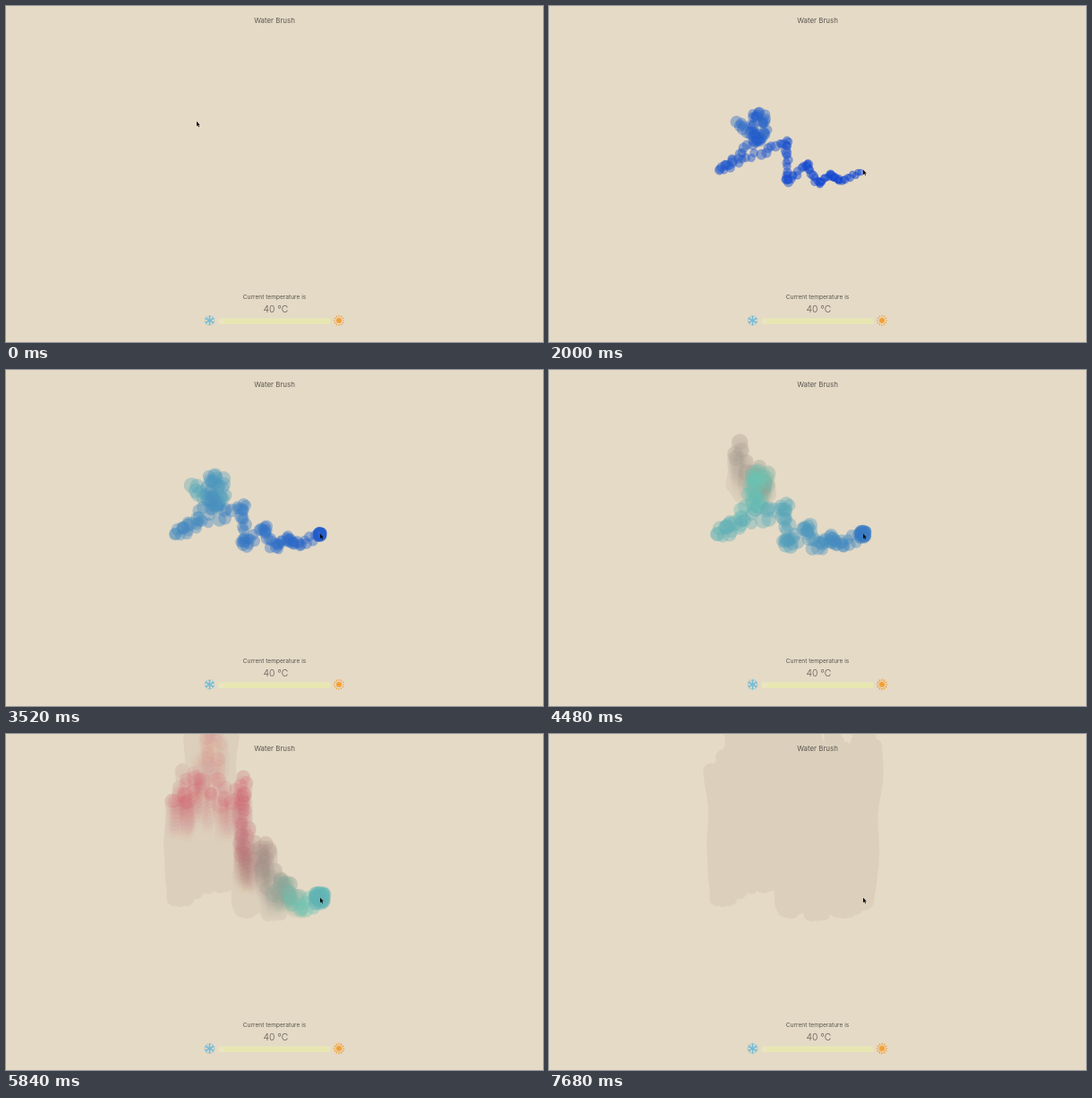
An HTML page with a canvas for the animation above (8 s loop, 600 by 375 pixels).

```html
<!DOCTYPE html>
<html lang="en">
<head>
<meta charset="utf-8">
<title>Water Brush</title>
<style>
  html, body { margin: 0; width: 100%; height: 100%; overflow: hidden; background: #e5dac6; }
  canvas { display: block; width: 600px; height: 375px; }
</style>
</head>
<body>
<canvas id="stage" width="600" height="375"></canvas>
<script>
const ctx = document.getElementById('stage').getContext('2d');
const LOOP = 8000, STEP = 80, TAU = Math.PI * 2;
const PAPER = '#e5dac6', RESIDUE = '#dcd0bc';
const BRUSH_START = 130, BRUSH_END = 2260, BRUSH_LAG = 70, DROP_EVERY = 12.5;
const LIFT_OFF = 3.9; // age in seconds at which water turns to vapour

const lerp = (a, b, k) => a + (b - a) * k;
const clamp = v => Math.max(0, Math.min(1, v));
const glide = k => lerp(k, k * k * (3 - 2 * k), 0.6);

// The pointer makes one loop, then zigzags between these corners.
const LOOP_TIME = 420, LOOP_X = 234, LOOP_Y = 134;
const CORNERS = [
  [192, 183], [267, 151], [266, 197], [288, 177],
  [301, 199], [315, 188], [325, 196], [351, 184]
];

function leg(from, to) {
  const time = 27 * Math.sqrt(Math.hypot(to[0] - from[0], to[1] - from[1]));
  return { time, at: k => from.map((v, i) => lerp(v, to[i], glide(k))) };
}

const loopBase = [LOOP_X, LOOP_Y + 14];
const legs = [
  leg([213, 130], loopBase),
  {
    time: LOOP_TIME,
    at: k => [LOOP_X + 7.5 * Math.sin(k * TAU), LOOP_Y + 14 * Math.cos(k * TAU)]
  },
  ...CORNERS.map((corner, i) => leg(i ? CORNERS[i - 1] : loopBase, corner))
];

function pointer(t) {
  let rest = Math.max(0, t - BRUSH_START);
  for (const part of legs) {
    if (rest < part.time) return part.at(rest / part.time);
    rest -= part.time;
  }
  return CORNERS[CORNERS.length - 1];
}

// Blue water warms to teal, turns grey, then becomes pink vapour.
const TINTS = [
  { age: 0, rgb: [22, 72, 208] },
  { age: LIFT_OFF, rgb: [110, 196, 178] },
  { age: 4.27, rgb: [162, 144, 136] },
  { age: 4.65, rgb: [214, 92, 108] }
];

function tint(age) {
  let i = 0;
  while (i < TINTS.length - 2 && TINTS[i + 1].age < age) i++;
  const a = TINTS[i], b = TINTS[i + 1];
  const k = clamp((age - a.age) / (b.age - a.age)) ** (i ? 1 : 1.5);
  return a.rgb.map((v, c) => Math.round(lerp(v, b.rgb[c], k))).join();
}

let seed = 41;
const random = () => (seed = seed * 16807 % 2147483647) / 2147483647;
const spread = n => (random() * 2 - 1) * n;

const drops = [];
for (let t = BRUSH_START; t < BRUSH_END; t += DROP_EVERY) {
  const [x, y] = pointer(t);
  drops.push({
    x, y, born: t + BRUSH_LAG,
    dx: spread(6), dy: spread(6.5), drift: spread(7), sway: random() * TAU,
    size: 0.85 + random() * 0.3,
    lift: 0.82 + random() * 0.36,
    life: 4.95 + random() * 0.3
  });
}

function pose(d, age) {
  const grow = clamp(age / 3.6);
  const rise = 125 * d.lift * Math.max(0, age - LIFT_OFF) ** 1.15;
  const loose = 0.2 + 0.8 * grow;
  const wave = 2 * (Math.sin(rise / 14 + d.sway) - Math.sin(d.sway));
  return {
    x: d.x + d.dx * loose + d.drift * rise / 120 + wave,
    y: d.y + d.dy * loose - rise,
    r: d.size * (4 + 4.2 * grow)
  };
}

function disc(x, y, r, color) {
  ctx.fillStyle = color;
  ctx.beginPath();
  ctx.arc(x, y, r, 0, TAU);
  ctx.fill();
}

function line(...points) {
  ctx.beginPath();
  for (const [x, y] of points) ctx.lineTo(x, y);
  ctx.stroke();
}

function drawResidue(d, age) {
  if (age < LIFT_OFF) return;
  const end = Math.min(age, d.life), points = [];
  for (let k = 0; k <= 12; k++) {
    const p = pose(d, lerp(LIFT_OFF, end, k / 12));
    points.push([p.x, p.y]);
  }
  ctx.strokeStyle = RESIDUE;
  ctx.lineCap = ctx.lineJoin = 'round';
  ctx.lineWidth = pose(d, end).r * 2.1;
  line(...points);
}

const fade = (d, age) => clamp((d.life - age) / 0.35);

function drawTrail(d, age) {
  for (let k = 9; k > 0; k--) {
    const past = age - k * 0.035;
    if (past < LIFT_OFF || age > d.life + 0.2) continue;
    const p = pose(d, past);
    const alpha = 0.055 * (1 - k / 10) * fade(d, past);
    disc(p.x, p.y, p.r, `rgba(${tint(age)},${alpha})`);
  }
}

function drawDrop(d, age) {
  if (age < 0 || age > d.life) return;
  const p = pose(d, age), color = tint(age);
  const body = lerp(lerp(0.5, 0.38, clamp(age / 3)), 0.19, clamp((age - LIFT_OFF) / 0.4));
  disc(p.x, p.y, p.r, `rgba(${color},${body * fade(d, age)})`);
  const rim = 0.4 * (1 - clamp(age / 2));
  if (rim > 0) {
    ctx.strokeStyle = `rgba(${color},${rim})`;
    ctx.lineWidth = 0.8;
    ctx.stroke();
    disc(p.x + 0.8, p.y - 0.6, 1.3, `rgba(190,215,245,${rim * 0.45})`);
  }
}

function label(text, x, y, size, weight = 400) {
  ctx.font = `${weight} ${size}px Inter, "Open Sans", sans-serif`;
  ctx.fillText(text, x, y);
}

function around(x, y, count, draw) {
  for (let i = 0; i < count; i++) {
    ctx.save();
    ctx.translate(x, y);
    ctx.rotate(i * TAU / count);
    draw();
    ctx.restore();
  }
}

function drawSnowflake(x, y) {
  ctx.strokeStyle = '#70bcd6';
  ctx.lineWidth = 0.9;
  around(x, y, 6, () => {
    line([0, 0], [0, -5.8]);
    line([-2, -5.2], [0, -3.5], [2, -5.2]);
    line([0, -2.5], [2.2, -1.25]);
  });
}

function drawSun(x, y) {
  disc(x, y, 3, '#f3a034');
  ctx.strokeStyle = '#f3a034';
  ctx.lineWidth = 1.1;
  around(x, y, 12, () => line([0, -4.2], [0, -5.9]));
}

function drawPanel() {
  ctx.fillStyle = '#5b5650';
  ctx.textAlign = 'center';
  label('Water Brush', 300, 19, 7.9);
  label('Current temperature is', 300, 326.5, 6.6);
  label('40 °C', 301.3, 341.5, 10.3, 300);
  ctx.fillStyle = '#e8e7b2';
  ctx.beginPath();
  ctx.roundRect(237.5, 348.8, 125, 6.2, 1.5);
  ctx.fill();
  disc(241, 352, 2.8, '#ebe5c4');
  drawSnowflake(227.5, 351);
  drawSun(372, 351);
}

function drawCursor([x, y]) {
  ctx.save();
  ctx.translate(x, y - 1.2);
  ctx.fillStyle = '#080808';
  ctx.beginPath();
  ctx.moveTo(0, 0);
  ctx.lineTo(0, 5.4);
  ctx.lineTo(1.3, 4.3);
  ctx.lineTo(2.3, 6.4);
  ctx.lineTo(3, 6);
  ctx.lineTo(2.2, 4);
  ctx.lineTo(3.7, 3.9);
  ctx.fill();
  ctx.restore();
}

function render(now) {
  ctx.fillStyle = PAPER;
  ctx.fillRect(0, 0, 600, 375);
  for (const draw of [drawResidue, drawTrail, drawDrop]) {
    for (const d of drops) draw(d, (now - d.born) / 1000);
  }
  drawPanel();
  drawCursor(pointer(now));
}

let shown = -1;
const start = performance.now();
function tick() {
  const t = (performance.now() - start) % LOOP;
  const now = Math.min(Math.floor(t / STEP) * STEP, 7680);
  if (now !== shown) render(shown = now);
  requestAnimationFrame(tick);
}
tick();
</script>
</body>
</html>
```
